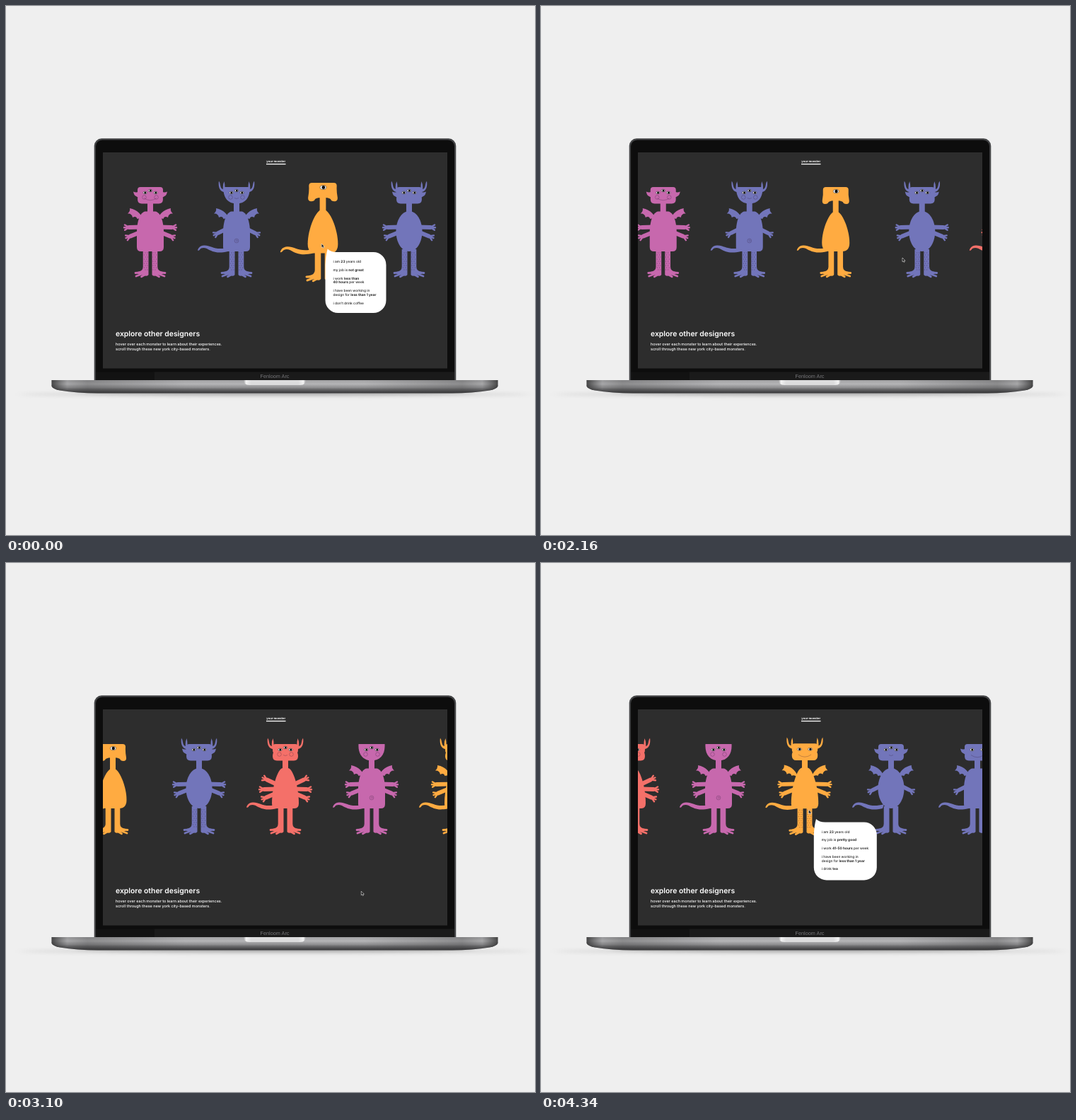
Animation, 748 px wide and 748 px high, one loop 4.36 s. Source, as an HTML page:

```html
<!DOCTYPE html>
<html lang="en">
<head>
<meta charset="utf-8">
<title>Monster gallery</title>
<style>
  html, body { margin: 0; width: 100%; height: 100%; overflow: hidden; background: #efefef; }
  svg { display: block; width: 100vw; height: 100vh; }
  text { font-family: Inter, "Open Sans", sans-serif; font-weight: 500; text-rendering: geometricPrecision; }
</style>
</head>
<body>
<svg viewBox="0 0 748 748">
  <defs>
    <clipPath id="view"><rect x="137" y="207" width="487" height="305.5"/></clipPath>
    <filter id="soft" x="-10%" y="-300%" width="120%" height="700%"><feGaussianBlur stdDeviation="8 2.5"/></filter>
    <linearGradient id="metal" x2="0" y2="1">
      <stop offset="0" stop-color="#a2a2a4"/><stop offset=".3" stop-color="#b4b4b6"/>
      <stop offset=".58" stop-color="#8c8c8e"/><stop offset=".68" stop-color="#6e6e70"/>
      <stop offset="1" stop-color="#343436"/>
    </linearGradient>
    <linearGradient id="ends">
      <stop offset="0" stop-color="#222" stop-opacity=".75"/><stop offset=".035" stop-color="#333" stop-opacity=".1"/>
      <stop offset=".08" stop-color="#333" stop-opacity=".3"/><stop offset=".3" stop-color="#333" stop-opacity="0"/>
      <stop offset=".7" stop-color="#333" stop-opacity="0"/><stop offset=".92" stop-color="#333" stop-opacity=".3"/>
      <stop offset=".965" stop-color="#333" stop-opacity=".1"/><stop offset="1" stop-color="#222" stop-opacity=".75"/>
    </linearGradient>
    <linearGradient id="notch">
      <stop offset="0" stop-color="#a5a5a7"/><stop offset=".04" stop-color="#f2f2f2"/>
      <stop offset=".12" stop-color="#dcdcdd"/><stop offset=".88" stop-color="#dcdcdd"/>
      <stop offset=".96" stop-color="#f2f2f2"/><stop offset="1" stop-color="#a5a5a7"/>
    </linearGradient>
  </defs>

  <rect width="748" height="748" fill="#efefef"/>
  <ellipse cx="380" cy="549" rx="360" ry="4" fill="#777" opacity=".16" filter="url(#soft)"/>
  <ellipse cx="380" cy="546" rx="280" ry="3.500" fill="#333" opacity=".35" filter="url(#soft)"/>

  <rect x="124.700" y="187.300" width="511.600" height="352" rx="10.500" fill="#424345"/>
  <rect x="127" y="189.400" width="507" height="350" rx="9" fill="#0d0d0d"/>
  <rect x="127" y="517.500" width="507" height="11.500" fill="#121212"/>
  <rect x="210" y="517.500" width="424" height="11.500" fill="#1a1a1a"/>
  <text x="380" y="526" text-anchor="middle" font-size="7.300" fill="#77777a" style="font-family:'Liberation Sans',Arial,sans-serif;font-weight:400">Fenloom Arc</text>
  <g id="base"></g>
  <path d="M336 529H424Q424 536 416 536H344Q336 536 336 529Z" fill="url(#notch)"/>

  <rect x="137" y="207" width="487" height="305.500" fill="#2d2d2d"/>
  <g fill="#fff">
    <text x="381.700" y="221.300" text-anchor="middle" font-size="4.100" style="font-weight:700">your monster</text>
    <rect x="368" y="222.900" width="27.500" height="1.300"/>
    <text x="155" y="467" font-size="10.400" style="font-weight:600">explore other designers</text>
    <text x="155" y="480" font-size="5.450">hover over each monster to learn about their experiences.</text>
    <text x="155" y="487.300" font-size="5.450">scroll through these new york city-based monsters.</text>
  </g>
  <g clip-path="url(#view)">
    <g id="monsters"></g>
    <g id="bubbles"></g>
    <path id="cursor" d="M0 0V5.600L1.300 4.500L2.200 6.400L3.200 5.900L2.400 4.100H4.100Z" fill="#111" stroke="#fff" stroke-width=".55"/>
  </g>
</svg>

<script>
const LOOP = 4360, GAP = 122, FIRST = 204;
const $ = id => document.getElementById(id);
const path = (d, extra = '') => `<path d="${d}" ${extra}/>`;
const both = s => s + `<g transform="scale(-1 1)">${s}</g>`;

const slab = 'M64.500 529H695.500V537.500Q694 541.500 684 543.500Q660 547.500 630 547.500H130Q100 547.500 76 543.500Q66 541.500 64.500 537.500Z';
$('base').innerHTML = path(slab, 'fill="url(#metal)"') + path(slab, 'fill="url(#ends)"');

// Monster parts: x is measured from the centre line, y on the stage.
const heads = {
  block: 'M-18 260Q-18 256 -14 256H14Q18 256 18 260V264Q18 267 17 268Q18 270 18 273Q18 279.500 12 279.500H-12Q-18 279.500 -18 273Q-18 270 -17 268Q-18 267 -18 264Z',
  bowl: 'M-18.500 256H18.500C19.500 271 12 279.500 0 279.500C-12 279.500 -19.500 271 -18.500 256Z',
  muzzle: 'M-18 260Q-18 256 -14 256H14Q18 256 18 260Q17.500 267 19 275Q19.500 280 15 280Q11 280 10 277Q7 275 0 275Q-7 275 -10 277Q-11 280 -15 280Q-19.500 280 -19 275Q-17.500 267 -18 260Z'
};
const bodies = {
  box: 'M-7 290.500H7C15 291.500 19 306 19 320V341Q19 347 13 347H-13Q-19 347 -19 341V320C-19 306 -15 291.500 -7 290.500Z',
  pear: 'M0 290C9 290 19.500 316 19.500 335Q19.500 347 9 347H-9Q-19.500 347 -19.500 335C-19.500 316 -9 290 0 290Z',
  dome: 'M-4 290H4C11 291 19 317 19 340Q19 347 13 347H-13Q-19 347 -19 340C-19 317 -11 291 -4 290Z',
  oval: 'M0 290C11 290 18.500 304 18.500 318.500C18.500 334 11 347 0 347C-11 347 -18.500 334 -18.500 318.500C-18.500 304 -11 290 0 290Z'
};
const horn = path('M-14 263.500C-23 264 -26.500 257 -25 247.500Q-23 250 -22.800 254Q-22 258.500 -19.200 259Q-19.500 252 -17.500 248Q-16.300 252 -16.500 259Z');
const fin = path('M-15 262Q-19 264.500 -24 262.500Q-23 268 -20 269Q-18 271 -15 271Z');
const wing = path('M-9 304C-12 295 -18 288 -29 286Q-28 290 -32 293.500Q-26 293 -25 299Q-20 296 -18.500 301Q-14 299 -9 304Z');
const tail = path('M-10 341C-30 347 -36 338 -46 338.500C-52 339 -54 342 -55 345.500Q-53.500 346.500 -52 344.500C-50 341.500 -46 341.500 -42 343C-34 347.500 -28 350.500 -12 347Z');
const leg = path('M-10.300 344H-2.500V380Q-4 383 -9 381L-18 378.500V376Q-10.300 374.500 -10.300 369Z', 'stroke="none"') +
  path('M-8 376.500L-21 377.500M-8 377.500L-20 382M-6 379L-12.500 382.800', 'stroke-width="2.800"');

function arm([x1, y1, x2, y2]) {
  const a = Math.atan2(y2 - y1, x2 - x1);
  const fingers = [-.55, 0, .55].map(k =>
    `M${x2} ${y2}l${7 * Math.cos(a + k)} ${7 * Math.sin(a + k)}`).join('');
  return path(`M${x1} ${y1}L${x2} ${y2}`, 'stroke-width="5.800"') + path(fingers, 'stroke-width="2.400"');
}
const armSets = {
  none: [],
  one: [[-12, 314, -26, 321]],
  two: [[-12, 312.500, -30, 313], [-12, 319, -28, 325.500]],
  three: [[-10, 314, -26, 306.500], [-12, 319.500, -30, 320], [-12, 325, -27, 331.500]]
};

function eye(x, y, r) {
  return `<ellipse cx="${x}" cy="${y}" rx="${r * 1.55}" ry="${r}" fill="#fff" stroke="#222" stroke-width=".5"/>` +
    `<circle cx="${x + .3}" cy="${y}" r="${r * .85}" fill="#111"/>`;
}
const eyeSets = {
  1: [[.5, 262, 2.600]],
  2: [[-7.500, 264, 1.900], [7.500, 264, 1.900]],
  3: [[-7.500, 264, 1.800], [0, 261, 1.800], [7.500, 264, 1.800]]
};
const ring = (x, y, r) => `<circle cx="${x}" cy="${y}" r="${r}"/>`;
const marks = {
  smile: path('M-9 271.500Q0 278 9 271.500'),
  cheeks: ring(-8.500, 270.500, 2.800) + ring(8.500, 270.500, 2.800),
  mouth: path('M-3 271.500Q0 273.500 3 271.500'),
  belly: ring(0, 332, 2.900) + path('M-1.500 332Q0 329.500 1.300 331.500Q1 333.500 -.5 332.800')
};
let dots = '';
for (let i = 0; i < 9; i++)
  dots += ring(i % 2 ? -8.500 : -7, 349 + i * 3, .3) + ring(i % 2 ? -5 : -4, 349 + i * 3, .3);
marks.dots = both(dots);

const PINK = '#c768ad', BLUE = '#7275ba', GOLD = '#ffab41', RED = '#f47069';
const cast = [
  [PINK, 'block', 'box', 'two', 3, 'wing fin', 'smile cheeks dots'],
  [BLUE, 'bowl', 'box', 'one', 3, 'horn wing tail', 'cheeks mouth belly dots'],
  [GOLD, 'muzzle', 'pear', 'none', 1, 'tail', ''],
  [BLUE, 'block', 'oval', 'two', 3, 'horn fin', 'dots'],
  [RED, 'block', 'dome', 'three', 3, 'horn tail', 'cheeks mouth'],
  [PINK, 'bowl', 'box', 'two', 3, 'wing tail', 'cheeks belly'],
  [GOLD, 'block', 'dome', 'two', 2, 'horn wing tail', 'smile dots'],
  [BLUE, 'block', 'oval', 'one', 3, 'fin wing tail', 'mouth'],
  [BLUE, 'block', 'box', 'one', 2, 'fin wing tail', 'smile']
];
const pairs = { horn, wing, fin };

function monster([color, head, body, arms, eyes, extras, details]) {
  const parts = extras.split(' ').map(k => k === 'tail' ? tail : both(pairs[k])).join('');
  const limbs = `<g stroke="${color}" stroke-linecap="round">${both(leg + armSets[arms].map(arm).join(''))}</g>`;
  const lines = details.split(' ').map(k => marks[k] || '').join('');
  return `<g fill="${color}">${parts}${limbs}<rect x="-4" y="274" width="8" height="20"/>` +
    path(bodies[body]) + path(heads[head]) +
    `<g fill="none" stroke="#33203a" stroke-opacity=".55" stroke-width=".5">${lines}</g>` +
    eyeSets[eyes].map(e => eye(...e)).join('') + '</g>';
}
$('monsters').innerHTML = cast.map(monster).join('');
const figures = [...$('monsters').children];

// Paragraphs are split by "|", lines by "/", bold by "*".
const hovers = [
  { who: 2, w: 86, h: 86, on: -500, off: 110, rise: 200,
    text: 'i am *23* years old|my job is *not great*|i work *less than*/*40 hours* per week|i have been working in/design for *less than 1 year*|i don’t drink coffee' },
  { who: 3, w: 91, h: 90, on: 290, off: 580, rise: 200,
    text: 'i am *57* years old|my job is *pretty good*|i work *41-50 hours* per week|i have been working in design/for *more than 20 years*|i drink *1-2 cups* of/coffee per day' },
  { who: 6, w: 89, h: 82, on: 4250, off: 9999, rise: 400,
    text: 'i am *23* years old|my job is *pretty good*|i work *41-50 hours* per week|i have been working in/design for *less than 1 year*|i drink *tea*' }
];

function bubble({ w, h, text }) {
  let y = 15.300, out = '';
  for (const para of text.split('|')) {
    for (const line of para.split('/')) {
      const rich = line.replace(/\*(.+?)\*/g, '<tspan font-weight="700">$1</tspan>');
      out += `<text x="11" y="${y}" font-size="4.850" fill="#222">${rich}</text>`;
      y += 5.700;
    }
    y += 6;
  }
  const r = 18, turn = (x, y) => `A${r} ${r} 0 0 1 ${x} ${y}`;
  const shape = `M0 ${r}Q.500 5 3.200 -4.500Q8 0 16 0H${w - r}${turn(w, r)}V${h - r}${turn(w - r, h)}H${r}${turn(0, h - r)}Z`;
  return '<g>' + path(shape, 'fill="#fff"') + out + '</g>';
}
$('bubbles').innerHTML = hovers.map(bubble).join('');
const cards = [...$('bubbles').children];

const scrollKeys = [[1640, 0], [1700, -14], [1860, -14], [1900, -28], [2150, -28], [2380, -96],
  [2820, -220], [3320, -357], [3780, -477], [4340, -563]];
const pointerKeys = [[0, 446, 336], [120, 468, 345], [380, 535, 357], [500, 511.500, 355], [1080, 511, 356],
  [2820, 511, 356], [3060, 503, 478], [3260, 499.500, 410], [3320, 498.500, 404], [3780, 455, 411],
  [4100, 415, 398], [4250, 387, 375], [4340, 378.500, 349]];

function at(keys, t) {
  const i = keys.findIndex(k => k[0] > t);
  if (i === 0) return keys[0].slice(1);
  if (i < 0) return keys[keys.length - 1].slice(1);
  const a = keys[i - 1], b = keys[i], p = (t - a[0]) / (b[0] - a[0]);
  return a.slice(1).map((v, n) => v + (b[n + 1] - v) * p);
}
const ramp = (t, start, span) => Math.min(1, Math.max(0, (t - start) / span));
const ease = p => p * p * (3 - 2 * p);

function draw(t) {
  const [shift] = at(scrollKeys, t);
  const [x, y] = at(pointerKeys, t);
  const [bx, by] = at(pointerKeys, t - 20);
  const grow = cast.map(() => 0);
  hovers.forEach((h, i) => {
    grow[h.who] = ease(ramp(t, h.on, h.rise)) * (1 - ease(ramp(t, h.off, 260)));
    cards[i].setAttribute('transform', `translate(${bx + 5.500} ${by + 12})`);
    cards[i].setAttribute('opacity', ramp(t, h.on, 70) * (1 - ramp(t, h.off, 100)));
  });
  figures.forEach((f, i) => f.setAttribute('transform',
    `translate(${FIRST + GAP * i + shift} 320) scale(${1 + .095 * grow[i]}) translate(0 -320)`));
  $('cursor').setAttribute('transform', `translate(${x} ${y})`);
}

const begin = performance.now();
function tick() {
  draw((performance.now() - begin) % LOOP);
  requestAnimationFrame(tick);
}
tick();
</script>
</body>
</html>
```
